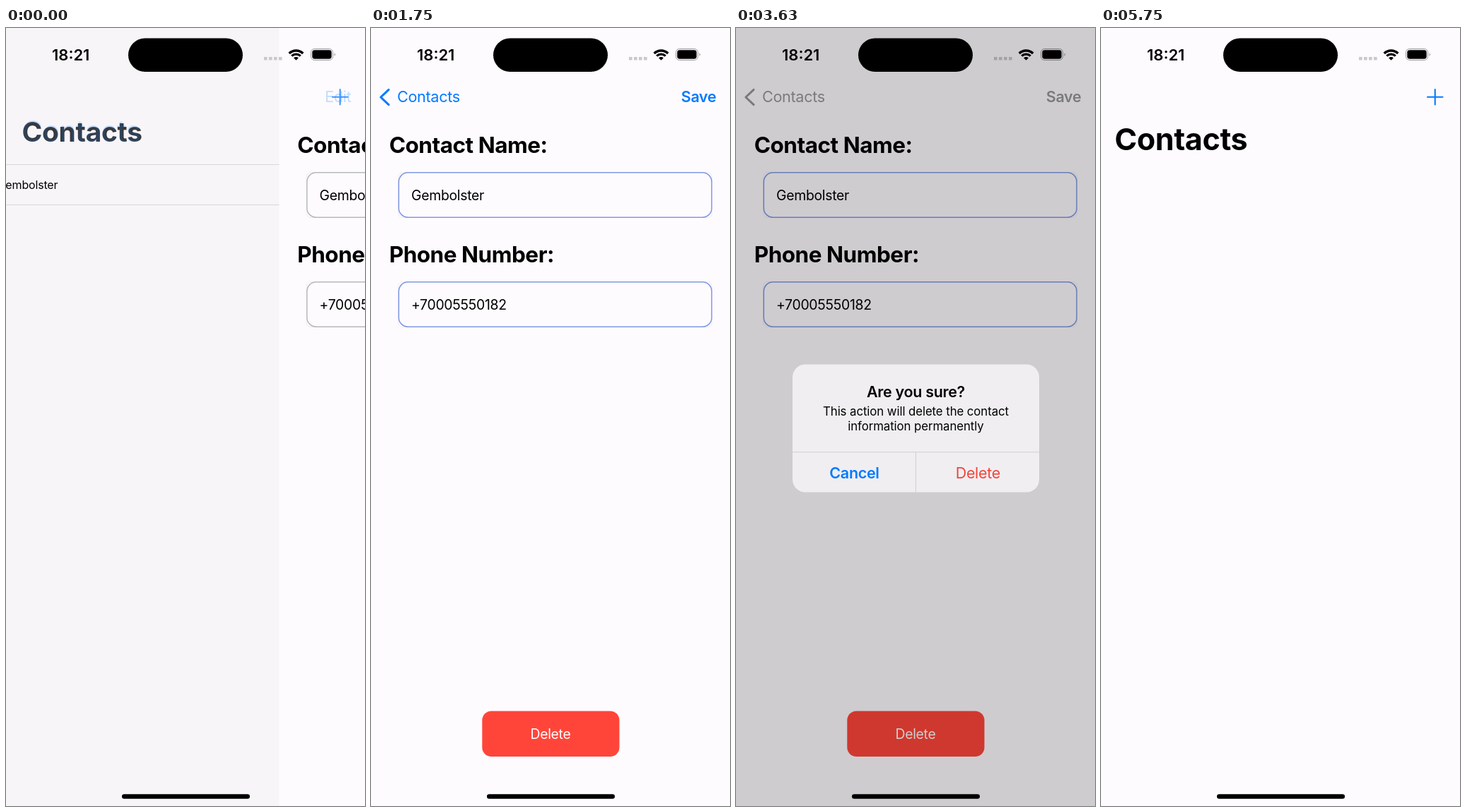
Write an HTML page that moves like this. It is 508x1102 px and loops after 5.88 s.

```html
<!DOCTYPE html>
<html lang="en">
<head>
<meta charset="utf-8">
<title>Contacts</title>
<style>
  html, body { margin: 0; height: 100%; overflow: hidden; background: #fefbff; }
  svg { display: block; width: 100vw; height: 100vh; }
  text { font-family: Inter, "Liberation Sans", sans-serif; font-optical-sizing: none; letter-spacing: -.015em; }
  .head { font-size: 31.5px; font-weight: 700; }
  .body { font-size: 19.4px; }
  .bar { font-size: 21.6px; }
  .semi { font-weight: 600; }
  .small { font-size: 16.8px; letter-spacing: -.005em; }
  .mid { text-anchor: middle; }
  .line { fill: none; stroke-linecap: round; stroke-linejoin: round; }
</style>
</head>
<body>
<svg viewBox="0 0 508 1102">
  <rect width="508" height="1102" fill="#fefbff"/>

  <g id="list">
    <g id="row">
      <text x="24" y="228" font-size="16" style="letter-spacing:-.01em">Gembolster</text>
      <path d="M0 193.5H660M0 250.5H660" stroke="#dcdbde"/>
    </g>
  </g>
  <rect id="shade" width="508" height="1102"/>

  <g id="detail">
    <rect width="508" height="1102" fill="#fefbff"/>
    <text class="head" x="25.7" y="176.5">Contact Name:</text>
    <text class="head" x="25.7" y="331.5">Phone Number:</text>
    <g fill="none" stroke="#efedf1">
      <rect x="38.5" y="204.5" width="444" height="64" rx="6"/>
      <rect x="38.5" y="359.5" width="444" height="64" rx="6"/>
    </g>
    <g id="fields" fill="#fefbff" stroke-width="1.5">
      <rect x="39.3" y="204.8" width="442.8" height="63.4" rx="13"/>
      <rect x="39.3" y="359.8" width="442.8" height="63.4" rx="13"/>
    </g>
    <text class="body" x="57" y="243.5">Gembolster</text>
    <text class="body" x="57" y="398.5">+70005550182</text>
    <g id="remove">
      <rect x="157.3" y="967.4" width="194.2" height="64.6" rx="13" fill="#ff453a"/>
      <text id="removeText" class="body mid" x="254" y="1007" fill="#fff">Delete</text>
    </g>
  </g>

  <g id="nav">
    <path id="chevron" class="line" d="M25 87.3L13.8 98L25 108.7" stroke-width="3"/>
    <g id="title">
      <text id="big" font-size="43" font-weight="700" style="letter-spacing:-.007em">Contacts</text>
      <text id="back" class="bar" transform="scale(2.09)">Contacts</text>
    </g>
    <path id="plus" class="line" d="M462 97.8H483.5M472.7 87V108.5" stroke="#007aff" stroke-width="2.1"/>
    <text id="action" class="bar" x="488.5" y="105" text-anchor="end"></text>
  </g>

  <g id="status">
    <text class="semi" x="65" y="46" font-size="22" style="letter-spacing:0">18:21</text>
    <rect x="173" y="14.5" width="162" height="47.5" rx="23.7"/>
    <path d="M365 43.3H391" stroke="#c9c8cc" stroke-width="4.4" stroke-dasharray="4.6 2.4"/>
    <g id="wifi" fill="none" stroke="#000"></g>
    <rect x="431.5" y="29.5" width="31" height="16" rx="5" fill="none" stroke="#9b9a9e"/>
    <rect x="433.3" y="31.3" width="27.4" height="12.4" rx="3.4"/>
    <path d="M464.6 35.2Q467.4 37.5 464.6 40Z" fill="#9b9a9e"/>
    <rect x="164" y="1085.3" width="181" height="6.4" rx="3.2"/>
  </g>

  <rect id="dim" width="508" height="1102"/>
  <g id="alert">
    <rect x="80" y="476.5" width="349" height="181" rx="18" fill="#f0eef1"/>
    <path d="M80 600.8H429M254.5 600.8V657.5" stroke="#d0ced2"/>
    <g class="mid">
      <text class="semi" x="254.5" y="523" font-size="21.5">Are you sure?</text>
      <text class="small" x="254.5" y="549">This action will delete the contact</text>
      <text class="small" x="254.5" y="570">information permanently</text>
      <text class="semi" x="167.5" y="638" font-size="21.5" fill="#007aff">Cancel</text>
      <text x="342.3" y="638" font-size="21.5" fill="#f0453b">Delete</text>
    </g>
  </g>
</svg>
<script>
const LOOP = 5880, STEP = 125;
const EDIT = 1630, PRESS = 3000, SHOW = 3048, HIDE = 4727, POP = 5199;
const BLUE = [0, 122, 255], GREY = [150, 150, 153];

const el = id => document.getElementById(id);
const set = (id, attrs) => {
  for (const name in attrs) el(id).setAttribute(name, attrs[name]);
};
const mix = (a, b, p) => a + (b - a) * p;
const blend = p => `rgb(${BLUE.map((c, i) => Math.round(mix(c, GREY[i], p)))})`;

// Critically damped spring from 0 to 1, ms since its start
const spring = (ms, speed = 1) => {
  const x = Math.max(0, ms) * .01826 * speed;
  return 1 - (1 + x) * Math.exp(-x);
};

el("wifi").innerHTML = [[14, 3.5], [8.9, 3.2], [2.4, 4.8]].map(([r, w]) => {
  const d = r * .7;
  return `<path d="M${410.5 - d} ${45.8 - d}A${r} ${r} 0 0 1 ${410.5 + d} ${45.8 - d}" stroke-width="${w}"/>`;
}).join("");

function draw(time) {
  const t = Math.floor(Math.floor(time / 10) * 10 / STEP) * STEP;
  const real = Math.ceil(t / 10) * 10;
  const push = speed => t < POP ? spring(t + 51, speed) : 1 - spring(t - POP, speed);
  const page = push(1), title = push(.83);
  const editing = real >= EDIT;
  const modal = t < HIDE ? spring(t - SHOW) : 1 - spring(t - HIDE);
  const locked = t > SHOW && t < HIDE;

  set("list", { transform: `translate(${-152.4 * page})` });
  set("row", { opacity: real < PRESS ? 1 : 0 });
  set("shade", { opacity: .1 * page });
  set("detail", { transform: `translate(${508 * (1 - page)})` });
  set("fields", { stroke: editing ? "#8099e4" : "#b9b8bc" });
  set("remove", { opacity: editing ? 1 : 0 });
  set("removeText", { opacity: real < PRESS || t > HIDE ? 1 : Math.max(.14, modal) });

  const x = mix(19.2, 37, title), y = mix(173, 105, title);
  set("title", { transform: `translate(${x} ${y}) scale(${mix(1, .4785, title)})` });
  set("big", { opacity: (1 - title) ** 1.3 });
  set("back", { opacity: title, fill: blend(modal) });
  set("chevron", { opacity: Math.max(0, (title - .3) / .7), stroke: blend(modal) });
  set("plus", { opacity: 1 - page });
  set("action", {
    opacity: page,
    fill: blend(locked ? 1 : 0),
    "font-weight": editing ? 600 : 400
  });
  el("action").textContent = editing ? "Save" : "Edit";

  const scale = t < HIDE ? mix(1.2, 1, modal) : 1;
  set("dim", { opacity: .188 * modal });
  set("alert", {
    opacity: modal,
    transform: `translate(254.5 567) scale(${scale}) translate(-254.5 -567)`
  });
}

let start;
function frame(now) {
  start ??= now;
  draw((now - start) % LOOP);
  requestAnimationFrame(frame);
}
draw(0);
requestAnimationFrame(frame);
</script>
</body>
</html>
```
